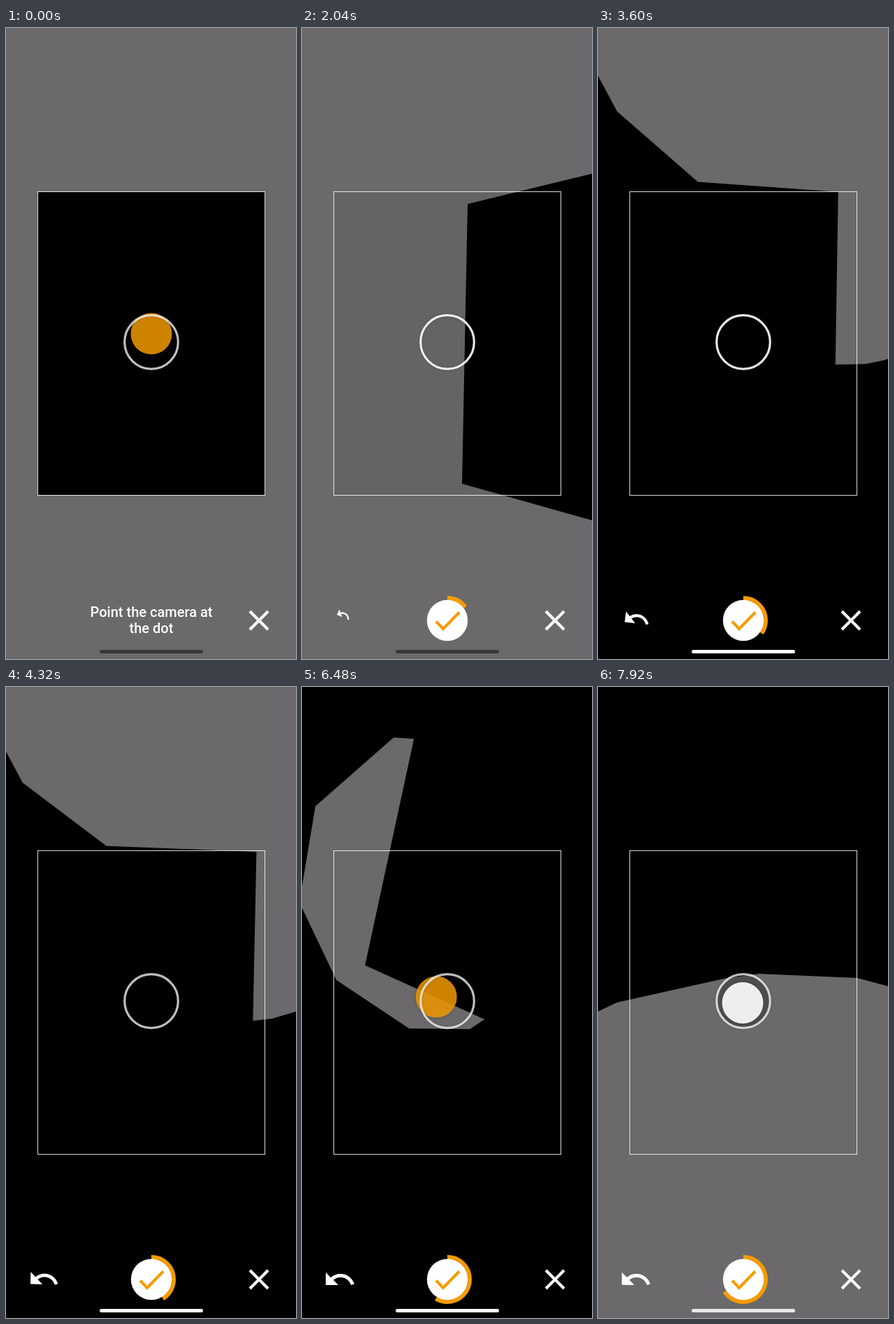
Animation, 415 px wide and 900 px high, one loop 8 s. Source, as an HTML page with a canvas:

```html
<!DOCTYPE html>
<html lang="en">
<head>
<meta charset="utf-8">
<title>Panorama capture</title>
<style>
html, body { margin: 0; width: 100%; height: 100%; overflow: hidden; background: #6b696b; }
canvas { display: block; width: 415px; height: 900px; }
</style>
</head>
<body>
<canvas id="stage" width="415" height="900"></canvas>
<script>
const ctx = document.getElementById('stage').getContext('2d');
const LOOP = 8000, GRAY = '#6b696b', ORANGE = '#f59b00';
const FRAME = [45, 234, 326, 432], CENTER = [208, 448];
const ROW_END = 3060, ZENITH = 6050, FLOOR = 7600;
const undoIcon = new Path2D('M12.5 8c-2.65 0-5.05.99-6.9 2.6L2 7v9h9l-3.62-3.62c1.39-1.16 3.16-1.88 5.12-1.88 3.54 0 6.55 2.31 7.6 5.5l2.37-.78C21.08 11.03 17.15 8 12.5 8z');

const shots = [
  { at: 320, from: -120, dot: [208, 424], arc: 25 },
  { at: 1250, from: 500, dot: [7, 430], arc: 50 },
  { at: 2030, from: 1430, dot: [7, 448], arc: 76 },
  { at: 2800, from: 2210, dot: [7, 448], arc: 101 },
  { at: 3360, from: 2990, dot: [208, 300], arc: 125 },
  { at: 4050, from: 3560, dot: [400, 448], arc: 149 },
  { at: 4850, from: 4320, dot: [400, 448], arc: 183 },
  { at: 5850, from: 5300, dot: [400, 448], arc: 211 },
  { at: 6760, from: 6300, dot: [156, 428.5], arc: 224 },
  { at: 7450, from: 6960, dot: [98, 288], arc: 237 },
  { at: 8040, from: 7600, dot: [207, 900], arc: 237 }
];

// Photo outlines on the horizon row
const flat = [45, 234, 371, 234, 371, 666, 45, 666];
const near = [195, 250, 521, 170, 521, 707, 204, 647];
const edgeA = [236, 251, 575, 160, 575, 720, 238, 650];
const edgeB = [237, 251, 575, 169, 575, 747, 229, 650];

// Uncovered area above the row
const rowOnly = [-50, -26, -50, 430, 0, 463, 34, 473, 354, 476, 381, 473, 415, 463, 500, 430, 500, -26];
const drift = [-60, -20, 24, 137, 144, 227, 359, 235, 354, 476, 381, 473, 415, 463, 500, 430, 500, -26];
const upper = [-50, -26, 40, 143, 160, 232, 374, 234, 371, 480, 397, 478, 415, 473, 500, 445, 500, -26];
const shifted = [-140, -195, -50, -26, 40, 143, 160, 232, 150, 480, 300, 487, 371, 480, 425, 468, 500, -26];
const gap = [131, 72, 19, 170, -4, 307, 49, 418, 153, 487, 240, 488, 261, 474, 90, 397, 160, 74];
const floor = [-5, 465, 27, 450, 180, 416, 230, 409, 371, 415, 420, 428, 420, 1000, -5, 1000];

const rowTrack = [[500, flat], [960, near], [1050, edgeA], [1429, edgeA], [1430, flat], [1830, edgeB],
  [2209, edgeB], [2210, flat], [2600, edgeB], [2999, edgeB], [3000, flat]];
const upperTrack = [[3559, rowOnly], [3560, upper], [3850, shifted], [4249, shifted], [4250, upper],
  [4320, drift], [4650, shifted], [5049, shifted], [5050, upper], [5300, upper], [5650, shifted],
  [6049, shifted], [6050, upper], [6400, move(gap, -16, -6)], [6480, gap], [6560, move(gap, 16, 6)]];

function clamp(v) { return Math.max(0, Math.min(1, v)); }
function ramp(t, a, b) { return clamp((t - a) / (b - a)); }
function mix(a, b, u) { return a.map((v, i) => v + (b[i] - v) * u); }
function move(p, x, y) { return p.map((v, i) => v + (i % 2 ? y : x)); }

function track(keys, t) {
  if (t <= keys[0][0]) return keys[0][1];
  for (let i = 1; i < keys.length; i++) {
    const [ta, a] = keys[i - 1], [tb, b] = keys[i];
    if (t < tb) return mix(a, b, ramp(t, ta, tb));
  }
  return keys[keys.length - 1][1];
}

function poly(p, color) {
  ctx.beginPath();
  for (let i = 0; i < p.length; i += 2) ctx.lineTo(p[i], p[i + 1]);
  ctx.closePath();
  ctx.fillStyle = color;
  ctx.fill();
}

function disc(x, y, r, color) {
  ctx.beginPath();
  ctx.arc(x, y, r, 0, Math.PI * 2);
  ctx.fillStyle = color;
  ctx.fill();
}

function line(points, color, width) {
  ctx.beginPath();
  for (let i = 0; i < points.length; i += 2) ctx.lineTo(points[i], points[i + 1]);
  ctx.strokeStyle = color;
  ctx.lineWidth = width;
  ctx.stroke();
}

function fill(color) {
  ctx.fillStyle = color;
  ctx.fillRect(0, 0, 415, 900);
}

function drawRow(t) {
  fill(GRAY);
  const quad = track(rowTrack, t);
  poly(quad, '#000');
  // The previous photo slides out to the right
  for (const start of [1430, 2210, 3000]) {
    if (t >= start && t < start + 600) {
      poly(move(start === 1430 ? edgeA : edgeB, quad[0] - 45, 0), '#000');
    }
  }
}

function drawUpper(t) {
  fill('#000');
  const u = ramp(t, 6960, 7250);
  const x = 100 * u, y = 160 * u;
  poly(move(track(upperTrack, t), x, y), GRAY);
  if (t >= 6960) poly(move(flat, x, y), '#000');
}

function drawFloor(t) {
  fill('#000');
  poly(move(floor, 0, 480 * (1 - ramp(t, 7600, 7840))), GRAY);
}

function drawScene(t) {
  if (t < ROW_END) drawRow(t);
  else if (t < FLOOR) drawUpper(t);
  else drawFloor(t);
}

function drawExposure(t) {
  const last = shots.filter(s => s.at <= t).pop();
  if (!last || t - last.at >= 200) return;
  ctx.fillStyle = `rgba(0,0,0,${(t - last.at) / 200})`;
  ctx.fillRect(...FRAME);
}

function drawDot(t) {
  const shot = shots.find(s => t < s.at);
  const aligned = shot.at - 200;
  const u = ramp(t, shot.from, aligned);
  if (u < 0.35) return;
  const white = ramp(t, aligned, aligned + 60);
  const [x, y] = mix(mix(shot.dot, CENTER, u), [207, 450.5], white);
  if (white) disc(...CENTER, 37, `rgba(0,0,0,${0.25 * white})`);
  ctx.shadowColor = 'rgba(0,0,0,.3)';
  ctx.shadowBlur = 4;
  const [r, g, b] = mix([245, 155, 0], [250, 250, 250], white);
  disc(x, y, 29.5, `rgba(${r},${g},${b},${0.84 + 0.1 * white})`);
  ctx.shadowBlur = 0;
}

function drawRing(t) {
  const bright = shots.some(s => t >= s.at && t < s.at + 250);
  ctx.beginPath();
  ctx.arc(...CENTER, 38.3, 0, Math.PI * 2);
  ctx.strokeStyle = `rgba(255,255,255,${bright ? 0.9 : 0.75})`;
  ctx.lineWidth = 3.2;
  ctx.shadowColor = 'rgba(0,0,0,.3)';
  ctx.shadowBlur = 3;
  ctx.stroke();
  ctx.shadowBlur = 0;
}

function drawUndo(t) {
  let size = 1;
  for (const s of shots.slice(1)) {
    const d = Math.abs(t - s.at - 80);
    if (d < 200) size = 0.17 + 0.83 * d / 200;
  }
  if (t < 520) size = ramp(t, 320, 520);
  const [x, y] = mix([65, 831], [54.5, 844], size);
  ctx.save();
  ctx.translate(x, y);
  ctx.rotate((1 - size) * 0.8);
  ctx.scale(size * 2, size * 2);
  ctx.translate(-12.25, -11.5);
  ctx.fillStyle = '#fff';
  ctx.fill(undoIcon);
  ctx.restore();
}

function drawProgress(t) {
  let arc = 0;
  for (const s of shots) arc += (s.arc - arc) * ramp(t, s.at, s.at + 80);
  ctx.beginPath();
  ctx.arc(208, 845, 32, -Math.PI / 2, (arc - 90) * Math.PI / 180);
  ctx.strokeStyle = ORANGE;
  ctx.lineWidth = 6;
  ctx.stroke();
  disc(208, 845, 29.2, '#fff');
  line([192, 846.5, 202, 857, 225, 833.5], ORANGE, 4);
}

function drawControls(t) {
  if (t < shots[0].at) {
    ctx.font = '500 20px Roboto, sans-serif';
    ctx.textAlign = 'center';
    ctx.fillStyle = '#fff';
    ctx.fillText('Point the camera at', 208, 840);
    ctx.fillText('the dot', 208, 863);
  } else {
    drawUndo(t);
    drawProgress(t);
  }
  line([349, 832, 375, 858], '#fff', 4);
  line([375, 832, 349, 858], '#fff', 4);
  ctx.beginPath();
  ctx.roundRect(134, 887, 148, 5, 2.5);
  ctx.fillStyle = t < ROW_END ? '#3a383a' : t < 7800 ? '#fff' : '#e8e8e8';
  ctx.fill();
}

function draw() {
  const t = performance.now() % LOOP;
  drawScene(t);
  drawExposure(t);
  drawDot(t);
  drawRing(t);
  ctx.strokeStyle = 'rgba(255,255,255,.85)';
  ctx.lineWidth = 1;
  ctx.strokeRect(45.5, 233.5, 325, 433);
  drawControls(t);
  requestAnimationFrame(draw);
}
draw();
</script>
</body>
</html>
```
